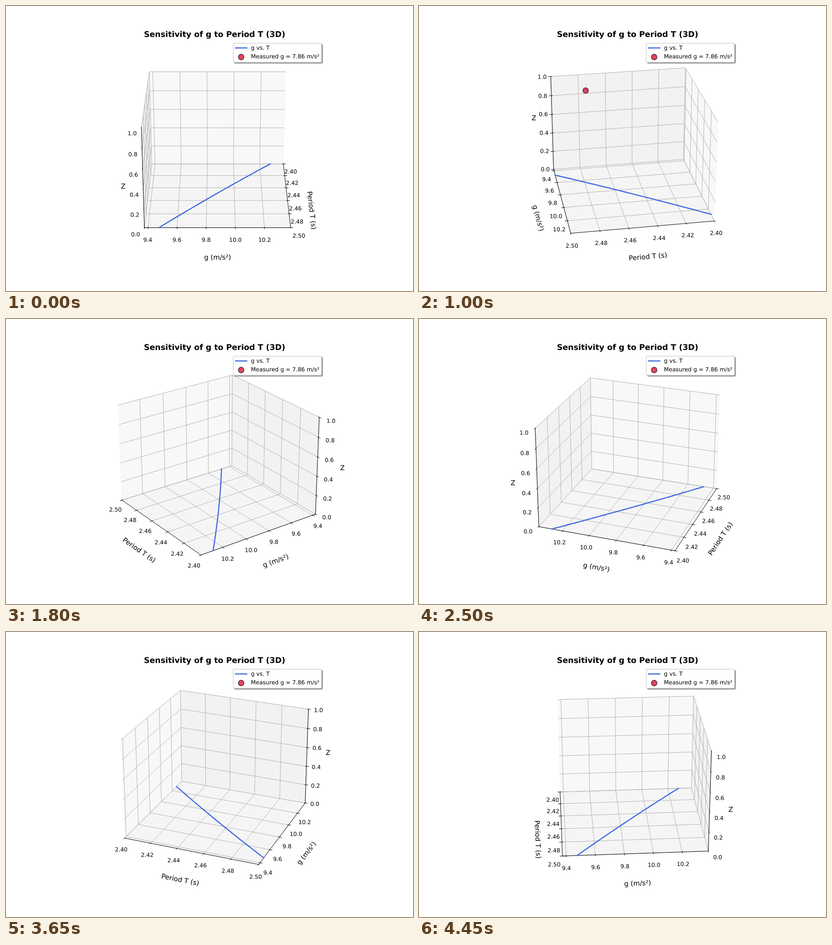
These frames come from a looping animation (894 by 626 pixels, 4.5 s). An HTML page:

```html
<!DOCTYPE html>
<html lang="en">
<head>
<meta charset="utf-8">
<title>Sensitivity of g to Period T</title>
<style>
  html, body { margin: 0; width: 100%; height: 100%; overflow: hidden; background: #fff; }
  svg { display: block; width: 894px; height: 626px; }
  text { font: 12.5px "DejaVu Sans", sans-serif; fill: #000; text-rendering: geometricPrecision; }
  .title { font-size: 17.5px; font-weight: bold; }
  .mid, .title { text-anchor: middle; }
  .label { font-size: 15px; }
  .pane { stroke-width: 1.25; }
  .grid { fill: none; stroke: #b0b0b0; stroke-width: 1; }
  .axis { fill: none; stroke: #000; stroke-width: 1; stroke-linecap: square; }
  .curve { fill: none; stroke: #4169e1; stroke-width: 2.5; stroke-linecap: square; stroke-linejoin: round; }
  .dot { fill: rgba(220, 20, 60, .8); stroke: rgba(0, 0, 0, .8); stroke-width: 1.25; }
  .shadow { fill: rgba(77, 77, 77, .5); stroke: rgba(77, 77, 77, .5); stroke-width: 1.25; }
  .frame { fill: #fff; stroke: #ccc; stroke-width: 1.25; }
</style>
</head>
<body>
<svg viewBox="0 0 900 630" preserveAspectRatio="none">
  <clipPath id="area"><rect x="218.7" y="75.6" width="485.1" height="485.1"/></clipPath>
  <g id="plot"></g>
  <text class="title" x="461.25" y="68">Sensitivity of g to Period T (3D)</text>
  <rect class="shadow" x="505" y="84.6" width="195" height="42" rx="2.5"/>
  <rect class="frame" x="502.5" y="82.1" width="195" height="42" rx="2.5"/>
  <path class="curve" d="M507.5 92.7H532.5"/>
  <circle class="dot" cx="520" cy="112.8" r="6.25"/>
  <text x="541.7" y="97">g vs. T</text>
  <text x="541.7" y="116">Measured g = 7.86 m/s²</text>
</svg>
<script>
const plot = document.getElementById('plot');
const STEP = 50, COUNT = 90;
const RAD = Math.PI / 180, ELEV = 25 * RAD;

// Perspective view of a 4:4:3 box from distance 10
const UNIT = 1.8294640721620434 * 25 / 24 / Math.hypot(4, 4, 3);
const BOX = [4 * UNIT, 4 * UNIT, 3 * UNIT];
const SCALE = 485.1 / 0.185, CX = 467.8, CY = 311.6;

const gravity = T => 4 * Math.PI ** 2 * 1.5 / T ** 2;
const LOW = [2.4, gravity(2.5) - 0.1, 0];
const HIGH = [2.5, gravity(2.4) + 0.1, 1];
const norm = (v, i) => (v - LOW[i]) / (HIGH[i] - LOW[i]) - 0.5;

// Distances from the box edge, as shares of its side
const PER_POINT = 48 / (2 * 388.08) * 0.08;
const TICK_PAD = 11.5 * PER_POINT;

const range = (start, step, n) => Array.from({ length: n }, (_, i) => start + i * step);
const AXES = [
  { ticks: range(2.4, 0.02, 6), digits: 2, name: 'Period T (s)', pad: 36, tickDir: 1, turn: true, pane: '242,242,242' },
  { ticks: range(9.4, 0.2, 5), digits: 1, name: 'g (m/s²)', pad: 36, tickDir: 0, turn: true, pane: '230,230,230' },
  { ticks: range(0, 0.2, 6), digits: 1, name: 'Z', pad: 25, tickDir: 0, pane: '236,236,236' }
];
const CURVE = range(2.4, 0.002, 51).map(T => [norm(T, 0), norm(gravity(T), 1), -0.5]);
const POINT = [norm(2.4544, 0), norm(7.86, 1), -0.5];

function camera(azim) {
  const c = Math.cos(azim), s = Math.sin(azim);
  const ce = Math.cos(ELEV), se = Math.sin(ELEV);
  return p => {
    const [x, y, z] = p.map((v, i) => v * BOX[i]);
    const along = x * c + y * s;
    const k = SCALE / (10 - ce * along - se * z);
    return [CX + k * (y * c - x * s), CY - k * (ce * z - se * along)];
  };
}

const put = (p, i, v) => p.map((old, j) => j === i ? v : old);
const pushOut = (p, skip, d) => p.map((v, j) => j === skip ? v : v + Math.sign(v) * d);

function draw(deg) {
  const view = camera(deg * RAD);
  const near = [deg < 90 || deg > 270 ? 0.5 : -0.5, deg <= 180 ? 0.5 : -0.5, 0.5];
  const far = near.map(v => -v);
  const edges = [
    [0, near[1], -0.5],
    [near[0], 0, -0.5],
    [near[0], far[1], 0]
  ];
  const path = pts => 'M' + pts.map(p => view(p).map(v => v.toFixed(2)).join(' ')).join('L');
  const line = (cls, pts) => `<path class="${cls}" d="${path(pts)}"/>`;
  let panes = '', grid = '', axes = '';

  AXES.forEach((axis, i) => {
    const a = i === 0 ? 1 : 0, b = i === 2 ? 1 : 2;
    const corners = [[-0.5, -0.5], [0.5, -0.5], [0.5, 0.5], [-0.5, 0.5]]
      .map(([u, v]) => put(put(far, a, u), b, v));
    const tint = `rgba(${axis.pane},.5)`;
    panes += `<path class="pane" fill="${tint}" stroke="${tint}" d="${path(corners)}"/>`;

    const edge = edges[i], dir = axis.tickDir, side = Math.sign(edge[dir]);
    const ends = [put(edge, i, far[i]), put(edge, i, near[i])];
    axes += line('axis', ends);

    for (const value of axis.ticks) {
      const at = norm(value, i);
      const root = put(far, i, at), foot = put(edge, i, at);
      const j = (i + 1) % 3, k = (i + 2) % 3;
      grid += line('grid', [put(root, j, near[j]), root, put(root, k, near[k])]);
      axes += line('axis', [
        put(foot, dir, edge[dir] - 0.008 * side),
        put(foot, dir, edge[dir] + 0.016 * side)
      ]);
      const [x, y] = view(pushOut(foot, i, TICK_PAD));
      axes += `<text class="mid" x="${x.toFixed(2)}" y="${Math.round(y + 9.9)}">${value.toFixed(axis.digits)}</text>`;
    }

    const [x, y] = view(pushOut(edge, i, axis.pad * PER_POINT));
    let angle = 0;
    if (axis.turn) {
      const [p, q] = ends.map(view);
      angle = (Math.atan2(p[1] - q[1], q[0] - p[0]) / RAD + 360) % 180;
      if (angle > 90) angle -= 180;
    }
    const shift = 0.8 * Math.abs(Math.sin(angle * RAD));
    axes += `<text class="mid label" y="4.1" transform="translate(${x + shift} ${y}) rotate(${-angle})">${axis.name}</text>`;
  });

  const [px, py] = view(POINT);
  plot.innerHTML = panes + grid + axes + line('curve', CURVE) +
    `<g clip-path="url(#area)"><circle class="dot" cx="${px}" cy="${py}" r="6.25"/></g>`;
}

let shown = -1;
function tick() {
  const step = Math.floor(performance.now() / STEP) % COUNT;
  if (step !== shown) {
    shown = step;
    draw(step * 360 / COUNT);
  }
  requestAnimationFrame(tick);
}
tick();
</script>
</body>
</html>
```
